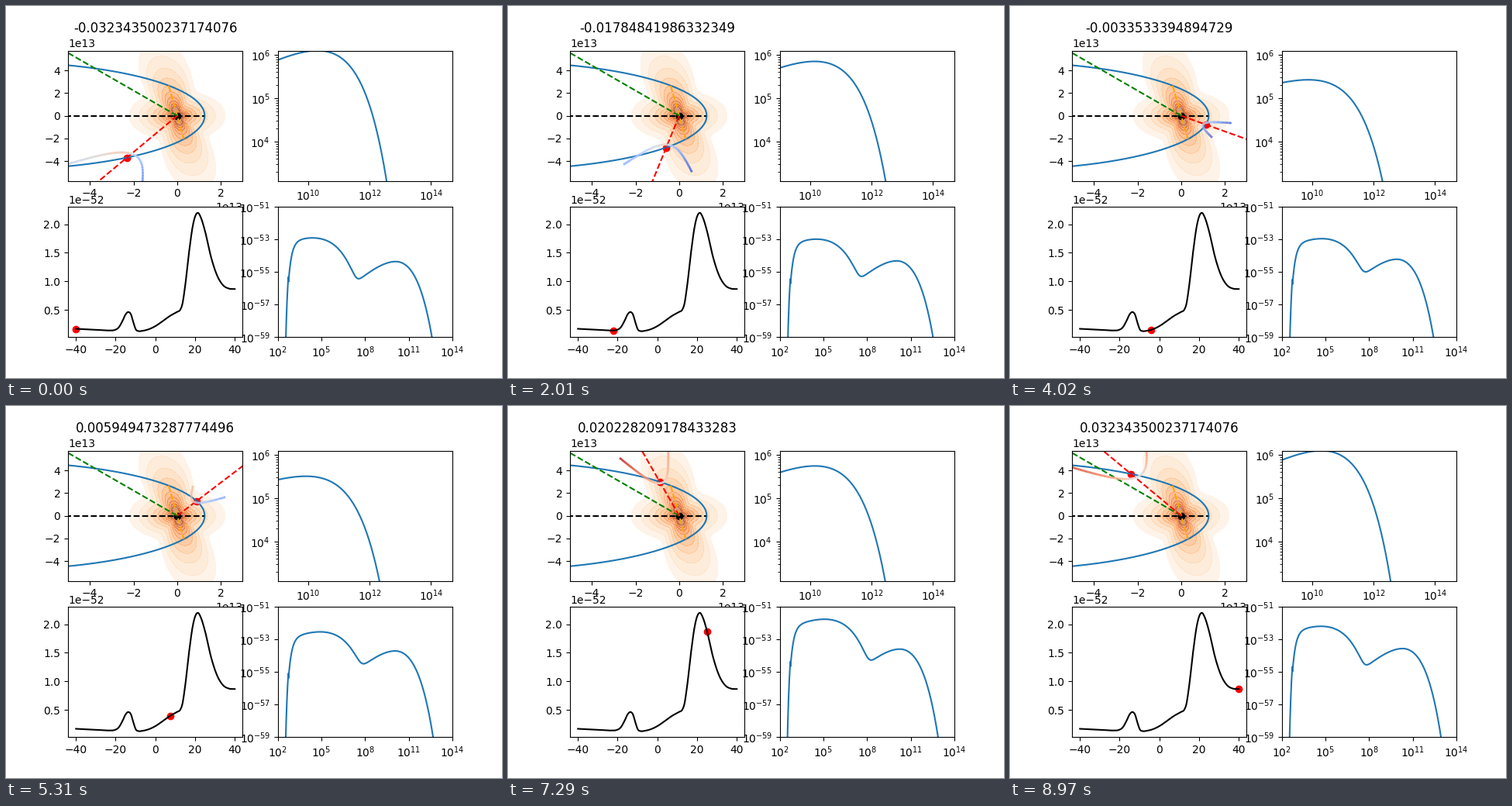
A matplotlib script for the animation above (9000 ms loop, 640 px wide and 480 px high).

```python
import numpy as np
import matplotlib.pyplot as plt
from matplotlib.animation import FuncAnimation
from matplotlib.collections import LineCollection

FRAMES, STEP = 300, 30
PERIOD = 1236.724526      # days
ECC, SEMI_P = 0.8698, 2.351e13
SPEEDUP = 1.047
DISK = np.radians(98.4)   # disk plane, as a true anomaly
SIGHT = np.radians(132)   # direction to the observer
UNIT = 1e13

days = np.linspace(-40, 40, FRAMES)


def orbit_r(nu):
    return SEMI_P / (1 + ECC * np.cos(nu))


def polar(r, nu):
    return r * np.cos(nu), r * np.sin(nu)


def true_anomaly(t):
    mean = 2 * np.pi * t / PERIOD * SPEEDUP
    e = np.cbrt(mean * 6)
    for _ in range(30):
        e = e - (e - ECC * np.sin(e) - mean) / (1 - ECC * np.cos(e))
    return 2 * np.arctan(np.sqrt((1 + ECC) / (1 - ECC)) * np.tan(e / 2))


def disk_boost(nu, amp=8.8, width=6.5):
    """Wind enhancement near the disk plane."""
    off = np.degrees(np.arcsin(np.sin(nu - DISK)))
    return 1 + amp * np.exp(-off ** 2 / (2 * width ** 2))


# flux history: smooth curve through a few (day, flux) knots
KNOTS = np.array([
    (-40, .168), (-34, .158), (-28, .147), (-23, .139), (-20.5, .147),
    (-18.5, .19), (-16.5, .31), (-15, .42), (-13.6, .462), (-12.3, .42),
    (-11, .27), (-9.8, .155), (-8.5, .128), (-6.5, .133), (-4, .152),
    (0, .215), (4, .31), (7.4, .395), (11, .465), (12.5, .5),
    (13.6, .6), (15, .92), (17, 1.52), (19, 2.0), (20.3, 2.16),
    (21.4, 2.2), (23, 2.11), (25, 1.88), (28, 1.43), (31, 1.11),
    (34, .935), (37, .873), (40, .865)])


def flux(t):
    x, y = KNOTS.T
    m = np.gradient(y, x)
    i = np.clip(np.searchsorted(x, t) - 1, 0, len(x) - 2)
    h = x[i + 1] - x[i]
    s = (t - x[i]) / h
    return ((1 + 2 * s) * (1 - s) ** 2 * y[i] + s * (1 - s) ** 2 * h * m[i]
            + s * s * (3 - 2 * s) * y[i + 1] + s * s * (s - 1) * h * m[i + 1])


def hump(lg, peak, a, b):
    """log10 of a power law with stretched cutoff, zero at its peak."""
    x = (lg - peak) * np.log(10)
    return a * (x - np.expm1(b * x) / b) / np.log(10)


def electrons(lg, lr, q):
    top = 6.1 + 1.34 * (lr - 0.638) - 0.23 * q
    peak = 9.75 + 0.85 * lr - 0.035 * q
    end = 12.213 + 0.53 * lr - 0.05 * q
    a = (3.1 - top) / hump(end, peak, 1, 0.5)
    return top + hump(lg, peak, a, 0.5)


def spectrum(lg, t, lr, q):
    post = 1 / (1 + np.exp(-(t - 5.5) / 2.5))
    x1 = 4.84 - 0.74 * lr + 0.32 * post + 0.4 * q
    y1 = np.log10(flux(t)) - 52.13 + 0.14 * q
    x2 = 9.85 + 0.4 * lr + 0.2 * post
    y2 = -54.2 - 0.25 * lr + 0.8 * post - 0.1 * q
    a2 = np.where(lg < x2, 0.85, 1.12)
    total = 10 ** (y1 + hump(lg, x1, 0.38, 0.3)) + 10 ** (y2 + hump(lg, x2, a2, 0.3))
    edge = 2.735
    tau = np.where(lg > edge, 10 ** (-2 * (lg - 3.12)), 4.9 * 10 ** (-2.5 * (lg - edge)))
    return np.log10(total) - tau / np.log(10)


def shock(r, nu):
    """Colliding-wind surface: points and log Doppler factor along it."""
    beta = 0.0098 / disk_boost(nu)
    tp = np.linspace(0.01, 3.1, 1500)
    y = beta * (1 - tp / np.tan(tp))
    ts = np.sqrt(np.maximum(3 * y - 0.6 * y * y, 0))
    ok = ts + tp < np.pi - 0.01
    tp, ts = tp[ok], ts[ok]
    d = np.sin(ts) / np.sin(ts + tp)
    along, side = 1 - d * np.cos(tp), d * np.sin(tp)
    arc = np.append(0, np.cumsum(np.hypot(np.diff(along), np.diff(side))))
    s = np.linspace(0, 0.96, 45)
    along, side = np.interp(s, arc, along), np.interp(s, arc, side)

    gamma = 1 + 0.4 * s / s[-1]
    speed = np.sqrt(1 - gamma ** -2)
    slope = np.arctan2(np.gradient(side), np.gradient(along))
    arms = []
    for sign in (-1, 1):
        x = r * (along * np.cos(nu) - sign * side * np.sin(nu))
        y = r * (along * np.sin(nu) + sign * side * np.cos(nu))
        mu = np.cos(nu + sign * slope - SIGHT)
        arms.append((x, y, -np.log(gamma * (1 - speed * mu))))
    x, y, dop = (np.concatenate([a[::-1], b]) for a, b in zip(*arms))
    return np.column_stack([x, y]), dop


fig, ((ax, ax_e), (ax_f, ax_s)) = plt.subplots(2, 2, figsize=(6.4, 4.8), dpi=100)

# orbit panel
gr, gp = np.meshgrid(np.geomspace(0.1, 9, 120), np.linspace(0, 2 * np.pi, 361))
gx, gy = polar(gr * UNIT, gp)
density = np.log10(disk_boost(gp, 8.3, 10.5) / gr ** 2)
levels = np.log10(2.2 ** -2) + 0.2 * np.arange(11)
ax.contourf(gx, gy, np.minimum(density, levels[-1] - 0.01), levels=levels,
            cmap="Oranges", alpha=0.5, vmin=levels[0] - 0.15, vmax=levels[-1] + 0.2)

nu_all = np.linspace(-2.9, 2.9, 600)
ax.plot(*polar(orbit_r(nu_all), nu_all))
ax.plot([-20 * UNIT, orbit_r(0)], [0, 0], "k--")
ends = np.array([DISK, DISK - np.pi])
ax.plot(*polar(orbit_r(ends), ends), "--", color="orange")
ax.plot(*polar(np.array([0, 9 * UNIT]), SIGHT), "--", color="green")
ax.scatter(0, 0, color="k")
pulsar = ax.scatter(0, 0, color="r")
ray, = ax.plot([], [], "r--")
bow = LineCollection([], cmap="coolwarm", linewidths=2)
bow.set_clim(-0.9, 0.9)
ax.add_collection(bow)
ax.set_xlim(-5 * UNIT, 3 * UNIT)
ax.set_ylim(-5.75 * UNIT, 5.75 * UNIT)
title = ax.set_title("0")

# electron panel
lg_e = np.linspace(9, 14.7, 400)
line_e, = ax_e.loglog([1e9], [1e5])
ax_e.set_xlim(1e9, 5e14)
ax_e.set_ylim(10 ** 3.1, 10 ** 6.1)

# flux panel
ax_f.plot(days, flux(days) * 1e-52, "k")
dot = ax_f.scatter(-40, 0.168e-52, color="r")
ax_f.set_xlim(-44, 44)
ax_f.set_ylim(0.023e-52, 2.304e-52)

# photon panel
lg_s = np.linspace(2, 14, 1000)
line_s, = ax_s.loglog([1e5], [1e-53])
ax_s.set_xlim(1e2, 1e14)
ax_s.set_ylim(1e-59, 1e-51)


def update(i):
    t = days[i]
    nu = true_anomaly(t)
    r = orbit_r(nu)
    lr, q = np.log10(r / UNIT), np.log10(disk_boost(nu))

    title.set_text(str(float(t / PERIOD)))
    pulsar.set_offsets([polar(r, nu)])
    ray.set_data(*polar(np.array([0, 12 * UNIT]), nu))
    pts, dop = shock(r, nu)
    bow.set_segments(np.stack([pts[:-1], pts[1:]], axis=1))
    bow.set_array((dop[:-1] + dop[1:]) / 2)

    line_e.set_data(10 ** lg_e, 10 ** np.maximum(electrons(lg_e, lr, q), -5))
    dot.set_offsets([(t, flux(t) * 1e-52)])
    line_s.set_data(10 ** lg_s, 10 ** np.maximum(spectrum(lg_s, t, lr, q), -70))
    return title, pulsar, ray, bow, line_e, dot, line_s


anim = FuncAnimation(fig, update, frames=FRAMES, interval=STEP, repeat=True, repeat_delay=0)
plt.show()
```
